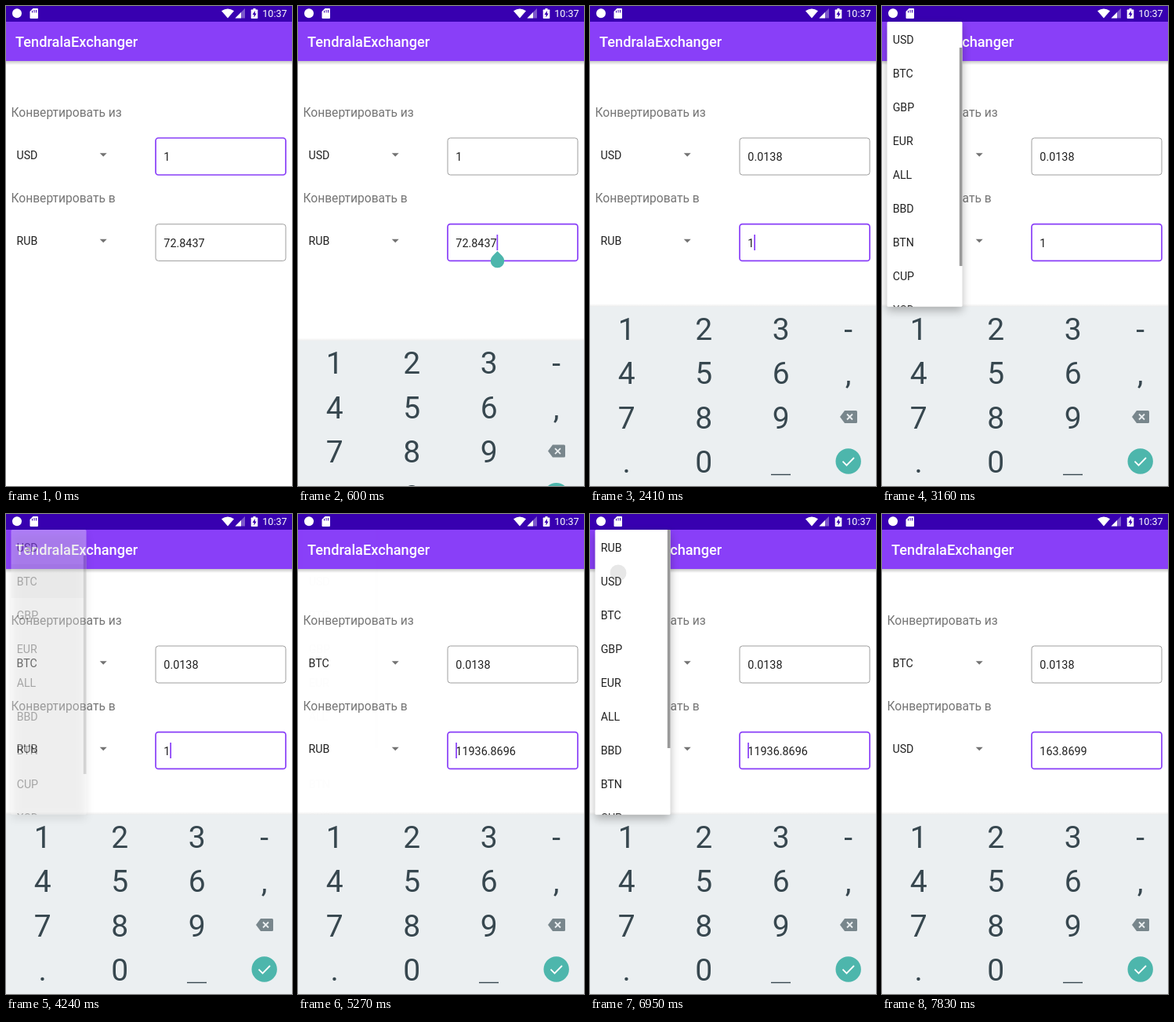
Animation, 365 px wide and 611 px high, one loop 8000 ms. Source, as an HTML page:

```html
<!DOCTYPE html>
<html lang="ru">
<head>
<meta charset="utf-8">
<title>Exchange</title>
<style>
html, body { margin: 0; width: 100%; height: 100%; overflow: hidden; background: #fff; }
svg { display: block; }
#stage { width: 365px; height: 611px; }
text { font-family: Roboto, "Noto Sans", sans-serif; white-space: pre; }
.title { font-size: 18.2px; font-weight: 500; fill: #fff; }
.label { font-size: 15.6px; fill: #757575; }
.value { font-size: 14.2px; fill: #212121; }
.sum { font-size: 14.4px; fill: #212121; }
.clock { font-size: 12.6px; fill: #fff; }
.key { font-size: 39px; fill: #37474f; text-anchor: middle; }
.field { fill: #fff; stroke: #9e9e9e; stroke-width: 1; }
.field.on { stroke: #893ff8; stroke-width: 1.7; }
#shade { filter: blur(6px); }
</style>
</head>
<body>
<svg id="stage" viewBox="0 0 365 611">
  <defs>
    <linearGradient id="below" x2="0" y2="1">
      <stop stop-color="#000" stop-opacity=".22"/><stop offset="1" stop-color="#000" stop-opacity="0"/>
    </linearGradient>
    <linearGradient id="above" x2="0" y2="1">
      <stop stop-color="#000" stop-opacity="0"/><stop offset="1" stop-color="#000" stop-opacity=".08"/>
    </linearGradient>
  </defs>
  <rect width="365" height="611" fill="#fff"/>
  <rect y="70" width="365" height="5" fill="url(#below)"/>
  <rect y="20" width="365" height="50" fill="#893ff8"/>
  <rect width="365" height="20" fill="#3800b0"/>

  <g fill="#fff">
    <circle cx="14" cy="9.3" r="6"/>
    <path d="M34.5 3H40q1 0 1 1V15q0 1-1 1H31.500q-1 0-1-1V7Z"/>
    <path d="M275 6.300Q283 .7 291 6.300L283 15.500Z"/>
    <path d="M305 3V15.500H292.500Z" opacity=".35"/>
    <path d="M300 8V15.500H292.500Z"/>
    <rect x="312.700" y="4.500" width="8.600" height="11.500" rx=".8"/>
    <rect x="315.500" y="3" width="3" height="2"/>
  </g>
  <path d="M33.500 6v2.500M36 5v3.500M38.500 5v3.500" stroke="#3800b0"/>
  <path d="M317.800 6L314.500 11H316.500V14.500L319.700 9.500H317.800Z" fill="#3800b0"/>
  <text class="clock" x="327.300" y="14.300">10:37</text>

  <text class="title" x="12" y="52.300">TendralaExchanger</text>
  <text class="label" x="6.500" y="140.700">Конвертировать из</text>
  <text class="label" x="6.500" y="250">Конвертировать в</text>
  <text class="value" id="from" x="13.500" y="194.800"></text>
  <text class="value" id="to" x="13.500" y="304.200"></text>
  <path d="M119.700 187.300h9l-4.500 4.500ZM119.700 296.700h9l-4.500 4.500Z" fill="#737373"/>
  <rect class="field" id="box1" x="191" y="168" width="166" height="47" rx="3.500"/>
  <rect class="field" id="box2" x="191" y="277.700" width="166" height="46.700" rx="3.500"/>
  <text class="sum" id="sum1" x="201.300" y="197"></text>
  <text class="sum" id="sum2" x="201.300" y="306.600"></text>
  <rect id="caret" y="291" width="1.700" height="20" fill="#893ff8"/>
  <path id="handle" d="M254.500 312L260.700 318.300A8.800 8.800 0 1 1 248.300 318.300Z" fill="#4db6ac"/>

  <g id="keys">
    <rect y="379" width="365" height="4" fill="url(#above)"/>
    <rect y="382.500" width="365" height="229" fill="#ebeff1"/>
    <path d="M231 596.500h25" stroke="#37474f" stroke-width="1.400"/>
    <path d="M325 515H339.500Q341 515 341 516.500V529.500Q341 531 339.500 531H325L319 523Z" fill="#78868c"/>
    <path d="M328 519.500l7 7m0-7l-7 7" stroke="#ebeff1" stroke-width="1.800"/>
    <circle cx="329.700" cy="579.500" r="16.200" fill="#4db6ac"/>
    <path d="M322.500 579.700l5 5 9.500-9.700" fill="none" stroke="#fff" stroke-width="1.800"/>
  </g>

  <rect id="shade" x="6.500" y="25" width="96" height="362.700"/>
  <g id="popup">
    <rect x="6.500" y="20" width="96" height="362.700" rx="1.500" fill="#fff"/>
    <rect id="press" x="6.500" y="64" width="96" height="43" opacity=".06"/>
    <svg x="6.500" y="20" width="96" height="362.700"><g id="list"></g></svg>
    <rect id="bar" x="98.800" width="3.700" height="278" fill="#999"/>
  </g>
  <circle id="touch" cx="36" cy="75" r="10.500" fill="#888" opacity=".2"/>
</svg>
<script>
const LOOP = 8000, STEP = 70, FADE = 210, ROW = 43;
const menus = [
  { open: 2950, close: 4100, scroll: ROW },
  { open: 5340, close: 7020, scroll: 0 }
];
const $ = id => document.getElementById(id);

function addText(parent, cls, x, y, str) {
  const el = document.createElementNS("http://www.w3.org/2000/svg", "text");
  el.setAttribute("class", cls);
  el.setAttribute("x", x);
  el.setAttribute("y", y);
  el.textContent = str;
  parent.append(el);
}

["123-", "456,", "789", ".0"].forEach((row, r) =>
  [...row].forEach((ch, c) =>
    addText($("keys"), "key", c < 3 ? 46.7 + c * 98.5 : 329.7, 424.9 + r * 56.4, ch)));

"RUB USD BTC GBP EUR ALL BBD BTN CUP XCD".split(" ").forEach((code, i) =>
  addText($("list"), "value", 7.2, 27.5 + i * ROW, code));

const ramp = (t, from, length) => Math.min(1, Math.max(0, (t - from) / length));
const within = (t, from, to) => t >= from && t < to;
const show = (id, on) => $(id).style.display = on ? "" : "none";
const set = (id, name, value) => $(id).setAttribute(name, value);

function write(id, str) {
  if ($(id).textContent !== str) $(id).textContent = str;
}

// One backspace, then the held key eats two characters per step.
function erase(str, t) {
  const held = t < 1410 ? 0 : 2 * (1 + Math.floor((t - 1410) / STEP));
  const gone = t < 1080 ? 0 : 1 + held;
  return str.slice(0, Math.max(0, str.length - gone));
}

function amount(t) {
  if (t < 1950) return erase("72.8437", t);
  if (t < 4450) return "1";
  return t < 7230 ? "11936.8696" : "163.8699";
}

function drawFields(t) {
  write("from", t < 4170 ? "USD" : "BTC");
  write("to", t < 7160 ? "RUB" : "USD");
  write("sum1", t < 2410 ? "1" : "0.0138");
  write("sum2", amount(t));
  $("box1").classList.toggle("on", t < 330);
  $("box2").classList.toggle("on", t >= 330);

  const width = t < 4450 ? $("sum2").getComputedTextLength() : 0;
  set("caret", "x", 201.2 + width);
  show("caret", within(t, 400, 2810) || within(t, 4240, 5340) || within(t, 6810, 7830));
  show("handle", within(t, 540, 1010));
}

function drawMenu(t) {
  const menu = menus[t < 5000 ? 0 : 1];
  const alpha = ramp(t, menu.open - STEP, FADE + STEP) - ramp(t, menu.close, FADE);
  set("popup", "opacity", alpha);
  set("shade", "opacity", alpha * .28);
  set("list", "transform", `translate(0 ${-menu.scroll})`);
  set("bar", "y", 20 + menu.scroll * .766);
  show("press", t >= menu.close);
  show("touch", within(t, menu.close - 4 * STEP, menu.close) && menu === menus[1]);
}

function draw(t) {
  drawFields(t);
  const left = 1 - ramp(t, 400, 410);
  set("keys", "transform", `translate(0 ${235 * left ** 2.5})`);
  drawMenu(t);
}

const start = performance.now();
function tick() {
  draw((performance.now() - start) % LOOP);
  requestAnimationFrame(tick);
}
tick();
</script>
</body>
</html>
```
